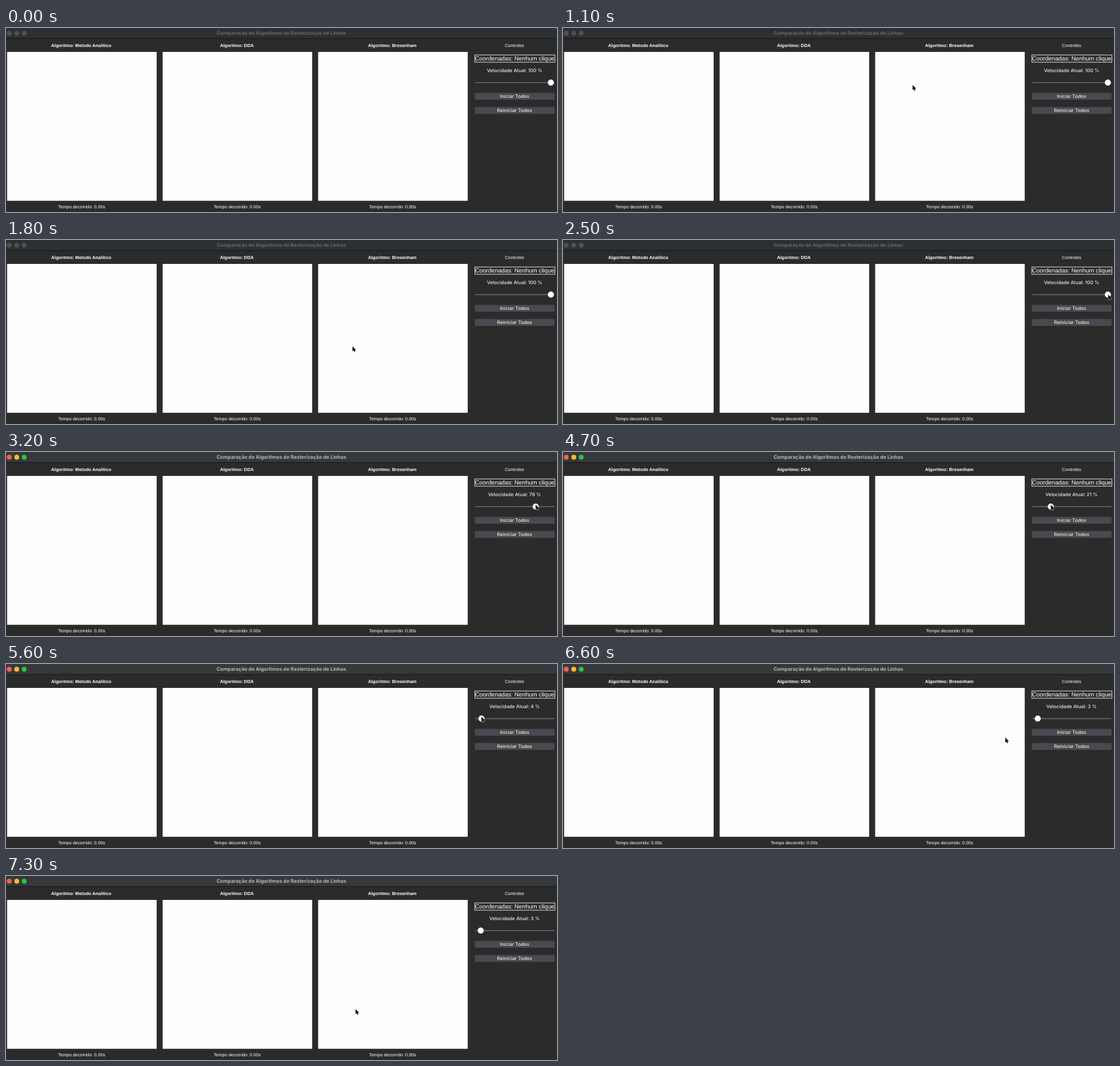
An HTML page that plays this animation: 896 px wide and 300 px high, repeating every 8 s.

```html
<!DOCTYPE html>
<html lang="pt">
<head>
<meta charset="utf-8">
<title>Rasterização de Linhas</title>
<style>
html, body { margin: 0; width: 100%; height: 100%; overflow: hidden; background: #2b2b2b; }
svg { display: block; width: 100vw; height: 100vh; }
text { text-anchor: middle; fill: #fff; text-rendering: geometricPrecision; }
.arial { font-family: "Liberation Sans", Arial, sans-serif; font-size: 7.32px; }
.big { font-size: 9.75px; }
.ui { font-family: Inter, sans-serif; font-size: 7.8px; font-weight: 500; fill: #e8e8e8; }
.bold { font-weight: 700; }
#title { font: 700 8px Inter, sans-serif; fill: #64676a; }
#bar { fill: #2c3033; }
#lights circle { fill: #4e5154; }
.active #title { fill: #b4b6b7; }
.active #bar { fill: #35393b; }
.active #lights .close { fill: #ff5f57; }
.active #lights .min { fill: #febc2e; }
.active #lights .max { fill: #28c840; }
</style>
</head>
<body>
<svg id="win" viewBox="0 0 896 300" preserveAspectRatio="none">
  <rect width="896" height="300" fill="#2b2b2b"/>
  <rect id="bar" width="896" height="17"/>
  <rect y="16.6" width="896" height="1" fill="#141516"/>
  <g id="lights">
    <circle class="close" cx="5.3" cy="8.5" r="3.9"/>
    <circle class="min" cx="17.5" cy="8.5" r="3.9"/>
    <circle class="max" cx="29.6" cy="8.5" r="3.9"/>
  </g>
  <text id="title" x="447.8" y="11.3">Comparação de Algoritmos de Rasterização de Linhas</text>
  <g id="panels"></g>

  <text class="arial" x="827" y="31">Controles</text>
  <rect x="762.4" y="44" width="130.2" height="11.8" fill="none" stroke="#dedede"/>
  <text class="arial big" x="827.3" y="53.4">Coordenadas: Nenhum clique</text>
  <text class="ui" id="speed" x="827" y="71.8"></text>
  <rect x="763" y="87.9" width="129" height="2.2" rx="1.1" fill="#5b5b5c"/>
  <circle id="knob" cy="89" r="4.9" fill="#fff"/>
  <g id="buttons"></g>
  <path id="cursor" d="M0 0V8.2L1.9 6.6 3.1 9.4 4.5 8.8 3.3 6H5.8Z"
        stroke="#fff" stroke-width=".7" stroke-linejoin="round" paint-order="stroke"/>
</svg>
<script>
const LOOP = 8000, TICK = 100, SHOW = 100, FOCUS = 2900, LEAVE = 6300;
const $ = id => document.getElementById(id);

// Stops of the pointer on its way to the slider: time, x, y
const WAY = [
  [SHOW, 511, 86], [400, 484, 87], [1100, 568.5, 93], [1400, 602, 108],
  [1900, 559, 181], [2200, 571, 182], [2500, 886.5, 89]
];

$('panels').innerHTML = ['Metodo Analitico', 'DDA', 'Bresenham'].map((name, i) => {
  const x = 1.8 + i * 252.9, mid = x + 121.4;
  return `<rect x="${x}" y="39" width="243.2" height="242.7" fill="#fefefe"/>
    <text class="arial bold" x="${mid - 0.8}" y="30.8">Algoritmo: ${name}</text>
    <text class="arial" x="${mid - 0.2}" y="294">Tempo decorrido: 0.00s</text>`;
}).join('');

$('buttons').innerHTML = ['Iniciar Todos', 'Reiniciar Todos'].map((label, i) => {
  const y = 105.8 + i * 23;
  return `<rect x="762.4" y="${y}" width="129.6" height="11.2" rx="1.5" fill="#4a494f"/>
    <text class="ui" x="827.1" y="${y + 8.5}">${label}</text>`;
}).join('');

const progress = (t, from, to) => Math.min(1, Math.max(0, (t - from) / (to - from)));
const smooth = u => u * u * (3 - 2 * u);
const slow = u => 1 - (1 - u) ** 1.25;
const mix = (a, b, u) => a + (b - a) * u;

// Two drags: 100 % to 21 %, then on to 3 %
const percentAt = t =>
  100 - 79 * slow(progress(t, FOCUS, 4300)) - 18 * slow(progress(t, 4900, 5700));

function pointerAt(t, knobX) {
  if (t >= FOCUS) {
    const u = smooth(progress(t, LEAVE, 7200));
    return [mix(knobX, 568.5, u), mix(86, 217, u)];
  }
  let [, x, y] = WAY[0];
  for (let i = 1; i < WAY.length; i++) {
    const u = smooth(progress(t, WAY[i - 1][0], WAY[i][0]));
    x = mix(x, WAY[i][1], u);
    y = mix(y, WAY[i][2], u);
  }
  return [x, y];
}

function draw(now) {
  const t = Math.floor((now % LOOP) / TICK) * TICK;
  const percent = Math.round(percentAt(t));
  const knobX = 768.5 + 1.175 * percent;
  $('win').classList.toggle('active', t >= FOCUS);
  $('speed').textContent = `Velocidade Atual: ${percent} %`;
  $('knob').setAttribute('cx', knobX);
  $('cursor').setAttribute('transform', `translate(${pointerAt(t, knobX)})`);
  $('cursor').setAttribute('visibility', t >= SHOW ? 'visible' : 'hidden');
}

const start = performance.now();
function frame() {
  draw(performance.now() - start);
  requestAnimationFrame(frame);
}
frame();
</script>
</body>
</html>
```
